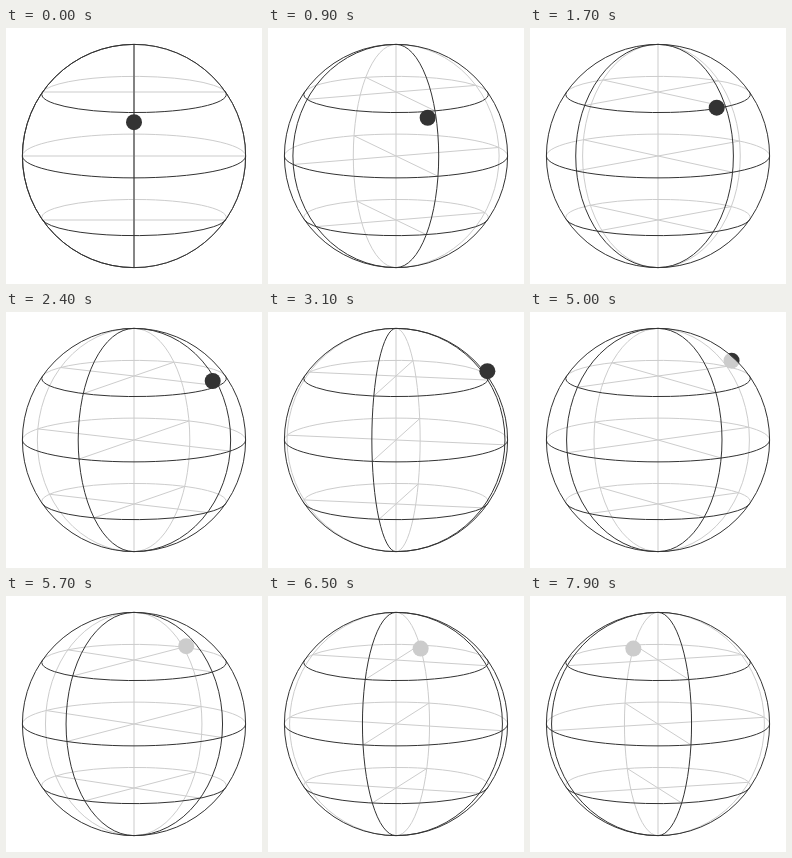
An HTML page with a canvas for the animation above (8 s loop, 256 by 256 pixels).

```html
<!DOCTYPE html>
<html lang="en">
<head>
<meta charset="utf-8">
<title>Rotating globe</title>
<style>
  html, body { margin: 0; width: 100%; height: 100%; overflow: hidden; background: #fff; }
  canvas { display: block; width: 256px; height: 256px; }
</style>
</head>
<body>
<canvas id="stage" width="256" height="256"></canvas>
<script>
const ctx = document.getElementById('stage').getContext('2d');
const { PI, sin, cos, asin, sqrt } = Math;
const LOOP = 8000, STEP = 100, DEG_PER_STEP = 2.5;
const R = 111.6;
const TILT = 0.2;                 // tangent of the viewing tilt
const COS2 = 1 / (1 + TILT * TILT);
const LEVELS = [-64, 0, 64];      // height of each parallel on the axis
const INK = '#333', VEIL = 'rgba(255,255,255,0.75)';

function line(x1, y1, x2, y2) {
  ctx.beginPath();
  ctx.moveTo(x1, y1);
  ctx.lineTo(x2, y2);
  ctx.stroke();
}

function disc(x, y, r, fill) {
  ctx.beginPath();
  ctx.arc(x, y, r, 0, 2 * PI);
  ctx.fillStyle = fill;
  ctx.fill();
}

function parallel(level, front) {
  const cy = level * COS2;
  const rx = sqrt(R * R - level * level * COS2);
  const ry = rx * TILT * sqrt(COS2);
  const edge = asin((level - cy) / ry);
  ctx.beginPath();
  ctx.ellipse(0, cy, rx, ry, 0, edge, PI - edge, !front);
  ctx.stroke();
}

// Half ellipse from pole to pole, on the right for a positive width
function meridian(width) {
  ctx.beginPath();
  ctx.ellipse(0, 0, Math.abs(width), R, 0, -PI / 2, PI / 2, width < 0);
  ctx.stroke();
}

// Chord joining a front meridian to its opposite along one parallel
function spoke(level, angle) {
  const t = TILT * cos(angle), q = 1 + t * t;
  const end = side => {
    const y = (level + side * t * sqrt(R * R * q - level * level)) / q;
    return [side * sin(angle) * sqrt(R * R - y * y), y];
  };
  line(...end(1), ...end(-1));
}

function ball(angle) {
  const x = 90.85 * sin(angle) - 3.35 * sin(3 * angle);
  const y = -64.2 + 20.4 * cos(angle) + 10 * cos(2 * angle);
  disc(x, y, 8, INK);
}

function draw(time) {
  const angle = Math.floor(time % LOOP / STEP) * DEG_PER_STEP * PI / 180;
  const turn = angle % (PI / 2);
  const facing = [turn, turn - PI / 2];
  const ballInFront = cos(angle) > 0;

  ctx.setTransform(1, 0, 0, 1, 0, 0);
  ctx.fillStyle = '#fff';
  ctx.fillRect(0, 0, 256, 256);
  ctx.translate(128, 128);
  ctx.strokeStyle = INK;
  ctx.lineWidth = 1;

  // Far side and inside
  line(0, -R, 0, R);
  for (const a of facing) meridian(-R * sin(a));
  for (const level of LEVELS) {
    parallel(level, false);
    for (const a of facing) spoke(level, a);
  }
  if (!ballInFront) ball(angle);

  disc(0, 0, R, VEIL);

  // Near side
  for (const a of facing) meridian(R * sin(a));
  for (const level of LEVELS) parallel(level, true);
  ctx.beginPath();
  ctx.arc(0, 0, R, 0, 2 * PI);
  ctx.stroke();
  if (ballInFront) ball(angle);
}

function tick() {
  draw(performance.now());
  requestAnimationFrame(tick);
}
tick();
</script>
</body>
</html>
```
